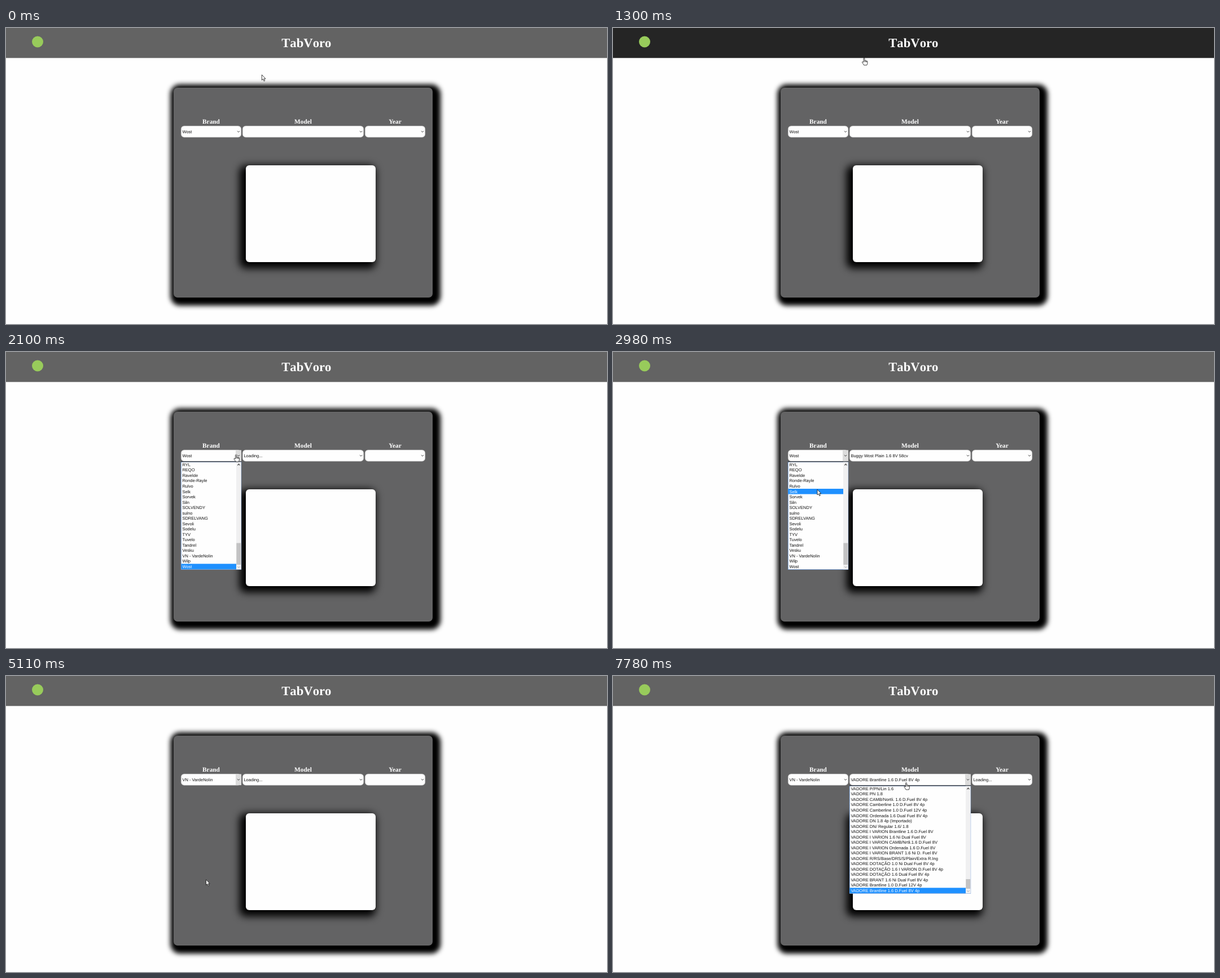
Recreate the animation shown at these times as an HTML page. Size 1065 by 526 pixels, loop 8000 ms.

```html
<!DOCTYPE html>
<html lang="en">
<head>
<meta charset="utf-8">
<title>Price lookup</title>
<style>
  html, body { margin: 0; width: 100%; height: 100%; overflow: hidden; background: #fefefe; }
  #stage { position: relative; width: 1065px; height: 526px; overflow: hidden; }
  #stage > * { position: absolute; }
  #panel {
    left: 297px; top: 106px; width: 459px; height: 373px; border-radius: 7px;
    background: #636364; box-shadow: 4.25px 4.25px 8.5px 9.9px #000;
  }
  #card {
    left: 425px; top: 244px; width: 230px; height: 172px; border-radius: 6px;
    background: #fefefe; box-shadow: -5.67px 5.67px 14px 5.67px #000;
  }
  svg { left: 0; top: 0; }
  text { font: 7.56px "Liberation Sans", Arial, sans-serif; fill: #111; text-rendering: geometricPrecision; }
  .label, .title { font: bold 11.34px "Liberation Serif", "Times New Roman", serif; fill: #fff; text-anchor: middle; }
  .title { font-size: 22.7px; font-kerning: none; }
</style>
</head>
<body>
<div id="stage">
  <div id="panel"></div>
  <div id="card"></div>
  <svg id="ui" width="1065" height="526" viewBox="0 0 1065 526">
    <rect id="header" width="1065" height="53.3"/>
    <circle cx="56" cy="24.5" r="10" fill="#98cb5b"/>
    <text class="title" x="532.3" y="34">TabVoro</text>
  </svg>
</div>
<script>
const LOOP = 8000, STEP = 80;
const LIST_TOP = 195.4, ROW = 9.526;

const brands = ["RYL", "REQO", "Ravelde", "Ronde-Rayle", "Rulvo", "Selk", "Sorvek", "Siln",
  "SOLVENDY", "sulno", "SDRELVANG", "Sevoli", "Sodelu", "TYV", "Tuvelo", "Tandrel",
  "Vesku", "VN - VardeNolin", "Wilp", "Wost"];

const models = ["P/PN/Lin 1.6", "PN 1.8", "CAMB/Nortli. 1.6 D.Fuel 8V 4p",
  "Camberline 1.0 D.Fuel 8V 4p", "Camberline 1.0 D.Fuel 12V 4p", "Ordenada 1.6 Dual Fuel 8V 4p",
  "DN 1.8 4p (Importado)", "DN/ Regular 1.6/ 1.8", "I VARION Brantline 1.6 D.Fuel 8V",
  "I VARION 1.6 Ni Dual Fuel 8V", "I VARION CAMB/Nrtli.1.6 D.Fuel 8V",
  "I VARION Ordenada 1.6 D.Fuel 8V", "I VARION BRANT 1.6 Ni D. Fuel 8V",
  "R/RS/Base/DRS/S/Plain/Extra R.Ing", "DOTAÇÃO 1.0 Ni Dual Fuel 8V 4p",
  "DOTAÇÃO 1.6 I VARION D.Fuel 8V 4p", "DOTAÇÃO 1.6 Dual Fuel 8V 4p",
  "BRANT 1.6 Ni Dual Fuel 8V 4p", "Brantline 1.0 D.Fuel 12V 4p",
  "Brantline 1.6 D.Fuel 8V 4p"].map(name => "VADORE " + name);

// Pointer moves: start time, number of steps, end x, end y
const moves = [
  [670, 5, 447, 40], [1300, 1, 445, 53], [1380, 6, 407.5, 182],
  [2180, 8, 364, 232], [2820, 3, 362, 244.3],
  [3370, 8, 358, 326], [4010, 3, 355.5, 349.5], [4250, 3, 354.5, 361.8],
  [5580, 6, 432, 197], [6830, 4, 519.5, 189]
];

// Text of each field from a given time on
const brandText = [[0, "Wost"], [5030, brands[17]]];
const modelText = [[0, ""], [2020, "Loading..."], [2420, "Buggy Wost Plain 1.6 8V 58cv"],
  [5030, "Loading..."], [6600, models[19]]];
const yearText = [[0, ""], [7620, "Loading..."]];

const ui = document.getElementById("ui");
const header = document.getElementById("header");

function add(parent, tag, attrs, content) {
  const el = document.createElementNS("http://www.w3.org/2000/svg", tag);
  for (const key in attrs) el.setAttribute(key, attrs[key]);
  if (content) el.textContent = content;
  parent.append(el);
  return el;
}

function show(el, on) {
  el.style.display = on ? "" : "none";
}

function makeSelect(label, x, w) {
  add(ui, "text", { class: "label", x: x + w / 2, y: 169.6 }, label);
  add(ui, "rect", { x: x + .2, y: 174, width: w - .4, height: 20.2, rx: 5.5, fill: "#fefefe", stroke: "#a4a4a4", "stroke-width": .6 });
  const shade = add(ui, "rect", { x: x + w - 10, y: 174.3, width: 10, height: 19.7, fill: "#dcdcdc" });
  add(ui, "path", { d: `M${x + w - 7.2} 183l2.2 2.2 2.2-2.2`, fill: "none", stroke: "#333", "stroke-width": .9 });
  const text = add(ui, "text", { x: x + 2.4, y: 186.7 });
  return { shade, text };
}

function makeList(names, x, w, thumbTop) {
  const g = add(ui, "g", {});
  const bar = x + w - 9;
  add(g, "rect", { x: x + .2, y: 195.2, width: w - .4, height: 191.4, fill: "#fefefe", stroke: "#5c8fd6", "stroke-width": .7 });
  add(g, "rect", { x, y: 194.4, width: w, height: 1, fill: "#222" });
  add(g, "rect", { x: bar, y: 195.5, width: 8.6, height: 190.8, fill: "#f0f0f1" });
  add(g, "rect", { x: bar + .3, y: thumbTop, width: 8, height: 378 - thumbTop, fill: "#c3c3c4" });
  add(g, "path", { d: `M${bar + 2.4} 201.3l2-2.2 2 2.2`, fill: "none", stroke: "#333", "stroke-width": 1.1 });
  add(g, "path", { d: `M${bar + 2.4} 381.2l2 2.2 2-2.2`, fill: "none", stroke: "#aaa", "stroke-width": 1 });
  const mark = add(g, "rect", { x: x + .4, width: w - 9.4, height: ROW, fill: "#1e90ff" });
  const rows = names.map((name, i) => add(g, "text", { x: x + 2.4, y: LIST_TOP + 7.5 + i * ROW }, name));
  const select = index => {
    mark.setAttribute("y", LIST_TOP + index * ROW);
    rows.forEach((row, i) => row.style.fill = i === index ? "#fff" : "");
  };
  return { g, select };
}

const brand = makeSelect("Brand", 310, 107);
const model = makeSelect("Model", 419, 215);
const year = makeSelect("Year", 636, 107);
show(year.shade, false);
const brandList = makeList(brands, 310, 107, 339.5);
const modelList = makeList(models, 419, 215, 361);
modelList.select(19);

const pen = { fill: "#fff", stroke: "#111", "stroke-width": .8, "stroke-linejoin": "round" };
const arrow = add(ui, "path", { d: "M0 0V9.7L2.2 7.7 3.8 11.4 5.4 10.7 3.8 7.2H6.7Z", ...pen });
const hand = add(ui, "path", {
  d: "M-1 8V1Q0-.6 1 1V5Q2 4 2.8 5.3 3.8 4.4 4.4 5.8 5.8 5.2 5.9 6.8V9.4Q5.7 11 4.8 13H-.4Q-1.4 11-3.4 8.4-3.7 6.8-2.4 7ZM1 5V7.4M2.8 5.3V7.6M4.4 5.8V7.8",
  ...pen
});

// Stepped progress from 0 to 1; the first step lands at the start time
function ramp(t, start, steps) {
  return t < start ? 0 : Math.min(1, (Math.floor((t - start) / STEP) + 1) / steps);
}

function pointerAt(t) {
  let x = 453.3, y = 83;
  for (const [start, steps, tx, ty] of moves) {
    const k = ramp(t, start, steps);
    x += (tx - x) * k;
    y += (ty - y) * k;
  }
  return { x, y };
}

function valueAt(t, table) {
  return table.filter(([start]) => t >= start).pop()[1];
}

function draw(t) {
  const { x, y } = pointerAt(t);
  const overSelect = y >= 174 && y < 195;
  const pointing = y < 54 || overSelect;
  for (const el of [arrow, hand]) el.setAttribute("transform", `translate(${x} ${y})`);
  show(arrow, !pointing);
  show(hand, pointing);

  const dark = ramp(t, 750, 4) - ramp(t, 1380, 5);
  const tone = Math.round(99 - 62 * dark);
  header.setAttribute("fill", `rgb(${tone},${tone},${tone})`);

  brand.text.textContent = valueAt(t, brandText);
  model.text.textContent = valueAt(t, modelText);
  year.text.textContent = valueAt(t, yearText);

  const brandOpen = t >= 1940 && t < 5030;
  show(brand.shade, t < 5190 && (t >= 1940 || overSelect));
  show(model.shade, t > 6800 && overSelect);
  show(brandList.g, brandOpen);
  show(modelList.g, t >= 7540);
  if (brandOpen) brandList.select(y < LIST_TOP ? 19 : Math.floor((y - LIST_TOP) / ROW));
}

const begin = performance.now();
function tick() {
  draw((performance.now() - begin) % LOOP);
  requestAnimationFrame(tick);
}
tick();
</script>
</body>
</html>
```
